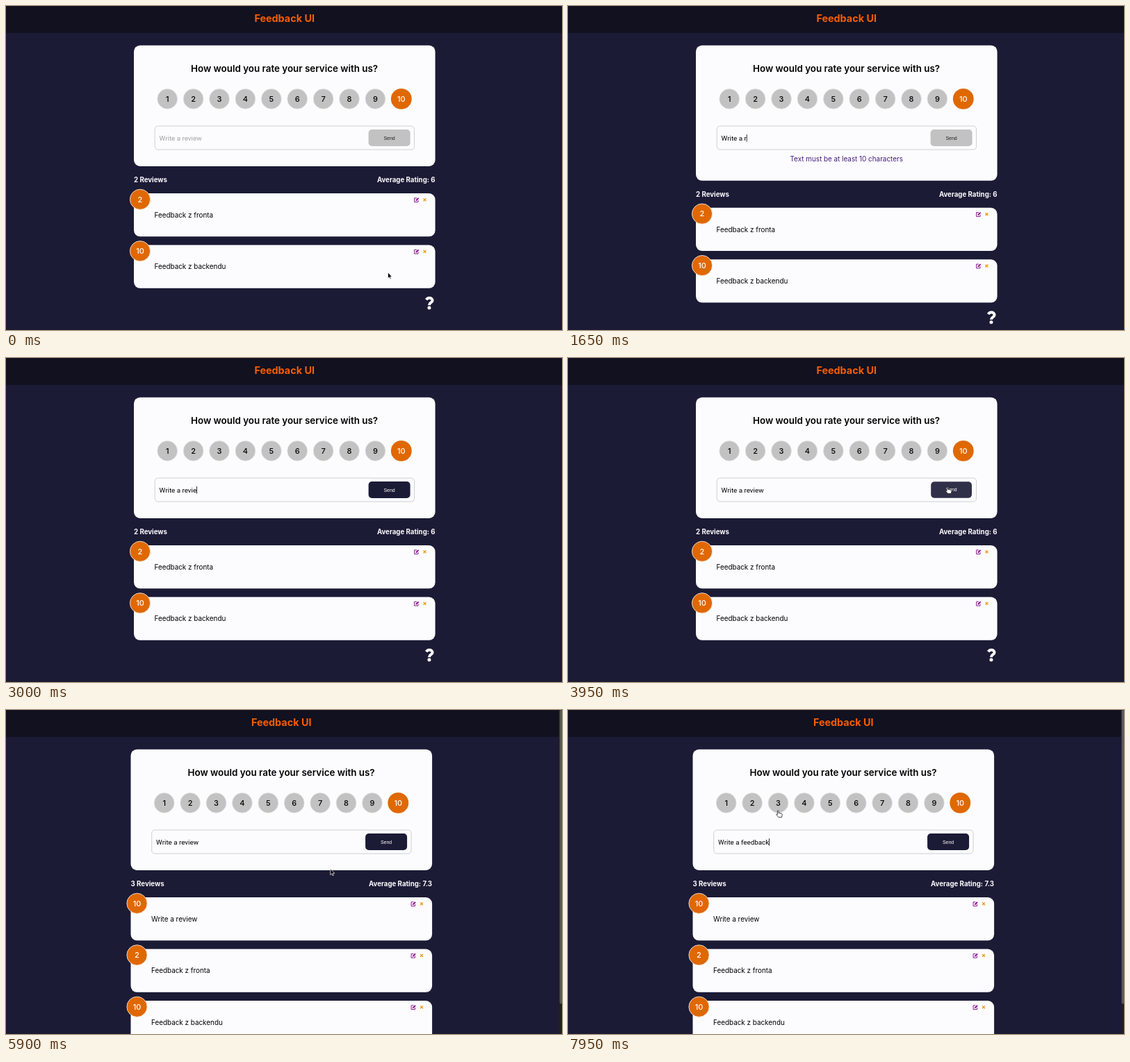
These frames come from a looping animation (800 px wide and 467 px high, 8000 ms). An HTML page:

```html
<!DOCTYPE html>
<html lang="en">
<head>
<meta charset="utf-8">
<title>Feedback UI</title>
<style>
  html, body { margin: 0; width: 100%; height: 100%; overflow: hidden; background: #1b1b36; }
  svg { display: block; width: 800px; height: 467px; }
  text { font-family: Inter, "Open Sans", sans-serif; white-space: pre; }
  .body { font-size: 9.9px; }
  .stat { font-size: 9.7px; font-weight: 700; fill: #fcfcfe; }
  .num { font-size: 11px; font-weight: 500; text-anchor: middle; }
  .field { font-family: Roboto, "Liberation Sans", sans-serif; font-size: 9.8px; }
</style>
</head>
<body>
<svg id="stage" viewBox="0 0 800 467">
  <rect width="800" height="467" fill="#1b1b36"/>
  <rect width="800" height="38.7" fill="#11111f"/>
  <g id="page">
    <text x="400.7" y="23" text-anchor="middle" font-size="14.4" font-weight="700" fill="#f95c00">Feedback UI</text>
    <rect id="panel" x="184" y="56.7" width="433.6" height="174.3" rx="9" fill="#fcfcfe"/>
    <text x="400.6" y="95.4" text-anchor="middle" font-size="13.4" font-weight="600">How would you rate your service with us?</text>
    <g id="ratings"></g>
    <rect x="214.2" y="173" width="373.4" height="34" rx="4.5" fill="none" stroke="#cfcfd1"/>
    <text id="entry" class="field" x="220.6" y="193.6"></text>
    <rect id="caret" y="185" width="0.8" height="10.6"/>
    <g id="send">
      <rect id="sendBox" x="521.6" y="178" width="60" height="24" rx="5"/>
      <text id="sendText" x="551.6" y="192.5" text-anchor="middle" font-size="7" style="font-family:'Liberation Sans',sans-serif">Send</text>
    </g>
    <text id="error" class="body" x="400.7" y="224.2" text-anchor="middle" fill="#451a7c">Text must be at least 10 characters</text>
    <g id="lower">
      <text id="count" class="stat" x="184" y="254"></text>
      <text id="average" class="stat" x="617.6" y="254" text-anchor="end"></text>
      <g id="cards"></g>
      <g id="help" fill="none" stroke="#fcfcfe">
        <path d="M70 125C105 80 140 52 196 52C262 52 320 95 320 153C320 245 192 235 192 344" stroke-width="110"/>
        <circle cx="192" cy="443" r="69" fill="#fcfcfe" stroke="none"/>
      </g>
    </g>
  </g>
  <g id="scrollbar">
    <rect x="795.4" width="4.6" height="467" fill="#212124"/>
    <rect id="thumb" x="796.6" width="3.4" rx="1.7" fill="#59595c"/>
  </g>
  <g id="pointer">
    <path id="arrow" d="M0 0V8.6L2 6.8L3.3 9.8L4.7 9.2L3.4 6.3H6Z" fill="#000" stroke="#fff" stroke-width=".7"/>
    <path id="hand" d="M-.8 .9C-.8 0 .8 0 .8 .9V3.8L5 4.7C6 5 6.2 5.6 6 6.5L5.3 10H.6L-2.2 6.7C-2.8 5.8-2 5.1-1.3 5.7L-.8 6.1Z" fill="#fff" stroke="#111" stroke-width=".75"/>
    <path id="beam" d="M-1.5-4.5Q0-4.5 0-3.5V3.5Q0 4.5-1.5 4.5M1.5-4.5Q0-4.5 0-3.5M0 3.5Q0 4.5 1.5 4.5" fill="none" stroke="#222" stroke-width=".8"/>
  </g>
</svg>
<script>
const LOOP = 8000, SENT = 4150, EDIT_AT = 5400;
const ORANGE = '#e06800', NAVY = '#1b1b36', GRAY = '#c2c2c2';
const $ = id => document.getElementById(id);
const set = (id, name, value) => $(id).setAttribute(name, value);
const show = (id, on) => { $(id).style.display = on ? '' : 'none'; };
const shift = (id, x, y) => set(id, 'transform', `translate(${x} ${y})`);

$('ratings').innerHTML = Array.from({ length: 10 }, (_, i) => {
  const x = 232.2 + i * 37.4, on = i === 9;
  return `<circle cx="${x}" cy="133.9" r="${on ? 14.9 : 14.4}" fill="${on ? ORANGE : GRAY}" stroke="#e2e2e4" stroke-width="${on ? 0 : .7}"/>
    <text class="num" x="${x}" y="137.7" fill="${on ? '#fff' : '#000'}">${i + 1}</text>`;
}).join('');

const card = (id, rating, label) => `<g id="${id}">
  <rect x="184" width="433.6" height="62.3" rx="9" fill="#fcfcfe"/>
  <circle cx="193" cy="8.8" r="14.6" fill="${ORANGE}" stroke="#f4e8e0" stroke-width=".9"/>
  <text class="num" x="193" y="12.7" fill="#fff">${rating}</text>
  <text class="body" x="213.5" y="34.8">${label}</text>
  <path d="M591 6.8H587.6V12.6H593V9.8" fill="none" stroke="#800080" stroke-width=".9" stroke-linejoin="round"/>
  <path d="M589.7 10.7L593.6 6.8" stroke="#800080" stroke-width="1.7"/>
  <path d="M600.6 7.4L604.4 11.2M604.4 7.4L600.6 11.2" stroke="#f0940a" stroke-width="1.3"/>
</g>`;
$('cards').innerHTML = card('added', 10, 'Write a review') +
  card('front', 2, 'Feedback z fronta') + card('back', 10, 'Feedback z backendu');

// start, fixed text, changing text, ms per key (negative deletes)
const edits = [
  [0, '', '', 1],
  [1000, '', 'Write a r', 70],
  [2650, 'Write a r', 'eview', 90],
  [SENT, '', '', 1],
  [EDIT_AT, 'Write a review', '', 1],
  [6350, 'Write a ', 'review', -65],
  [7050, 'Write a ', 'fe', 100],
  [7350, 'Write a fe', 'edback', 80]
];

function entryAt(t) {
  const [start, base, part, step] = edits.filter(e => e[0] <= t).pop();
  const keys = Math.min(part.length, Math.floor((t - start) / Math.abs(step)) + 1);
  return base + part.slice(0, step < 0 ? part.length - keys : keys);
}

// time, x, y
const path = [
  [0, 549.5, 384], [50, 549.5, 384], [800, 290, 190], [3450, 290, 190],
  [3750, 546, 185.5], [4250, 546, 185.5], [4450, 555.5, 185.3], [4980, 555.5, 185.3],
  [5280, 586, 278], [5430, 586, 278], [5660, 466.7, 229], [5900, 466.7, 229],
  [6150, 282, 190], [7900, 282, 190], [7950, 302.2, 144.6], [LOOP, 302.2, 144.6]
];

function pointerAt(t) {
  const i = path.findIndex(p => p[0] > t);
  const [t0, x0, y0] = path[i - 1], [t1, x1, y1] = path[i];
  const u = (t - t0) / (t1 - t0), k = u * u * (3 - 2 * u);
  return [x0 + (x1 - x0) * k, y0 + (y1 - y0) * k];
}

const within = (x, y, l, t, r, b) => x > l && x < r && y > t && y < b;
const hidden = t => (t >= 1000 && t < 3450) || (t >= 6350 && t < 7950);

function caretOn(t) {
  if (t >= 900 && t < 3200) return true;
  if (t >= 3200 && t < 4050) return t >= 3500 && t < 3850;
  return t >= 6170;
}

function draw(t) {
  const text = entryAt(t), size = text.length;
  const enabled = size > 10, error = size > 1 && !enabled;
  const sent = t >= SENT + 50, dx = sent ? -4.5 : 0, dy = error ? 20.8 : 0;

  shift('page', dx, 0);
  shift('lower', 0, dy);
  set('panel', 'height', 174.3 + dy);
  show('error', error);

  $('entry').textContent = text || 'Write a review';
  set('entry', 'fill', text ? '#000' : '#a0a0a2');
  set('caret', 'x', 220.6 + (text ? $('entry').getComputedTextLength() : 0));
  show('caret', caretOn(t));

  $('count').textContent = `${sent ? 3 : 2} Reviews`;
  $('average').textContent = `Average Rating: ${sent ? '7.3' : '6'}`;
  const fade = Math.max(0, Math.min(1, (t - SENT - 50) / 280));
  set('added', 'opacity', 1 - (1 - fade) ** 2);
  show('added', sent);
  ['added', 'front', 'back'].forEach((id, i) => shift(id, 0, 270 + 74.5 * (sent ? i : i - 1)));
  set('help', 'transform', `translate(602 ${418.8 + (sent ? 74.5 : 0)}) scale(.0363)`);

  show('scrollbar', sent);
  set('thumb', 'height', 467 * 467 / (515 + dy));

  const [x, y] = pointerAt(t), px = x - dx;
  const onSend = enabled && !hidden(t) && within(px, y, 521, 178, 582, 202);
  const onRating = Math.abs(y - 133.9) < 14.5 && Math.abs((px - 232.2 + 18.7) % 37.4 - 18.7) < 14.5;
  const onEdit = sent && within(px, y, 586, 273, 596, 284);
  const onField = within(px, y, 214, 173, 520, 207);
  const hand = onSend || onEdit || onRating;
  shift('pointer', x, y);
  show('pointer', !hidden(t));
  show('hand', hand);
  show('beam', onField);
  show('arrow', !hand && !onField);

  set('sendBox', 'fill', enabled ? NAVY : GRAY);
  set('sendText', 'fill', enabled ? '#fff' : '#222');
  set('send', 'opacity', onSend ? .9 : 1);
  set('send', 'transform', onSend ? 'translate(551.6 190) scale(.98) translate(-551.6 -190)' : '');
}

function tick(now) {
  draw(now % LOOP);
  requestAnimationFrame(tick);
}
draw(0);
requestAnimationFrame(tick);
</script>
</body>
</html>
```
